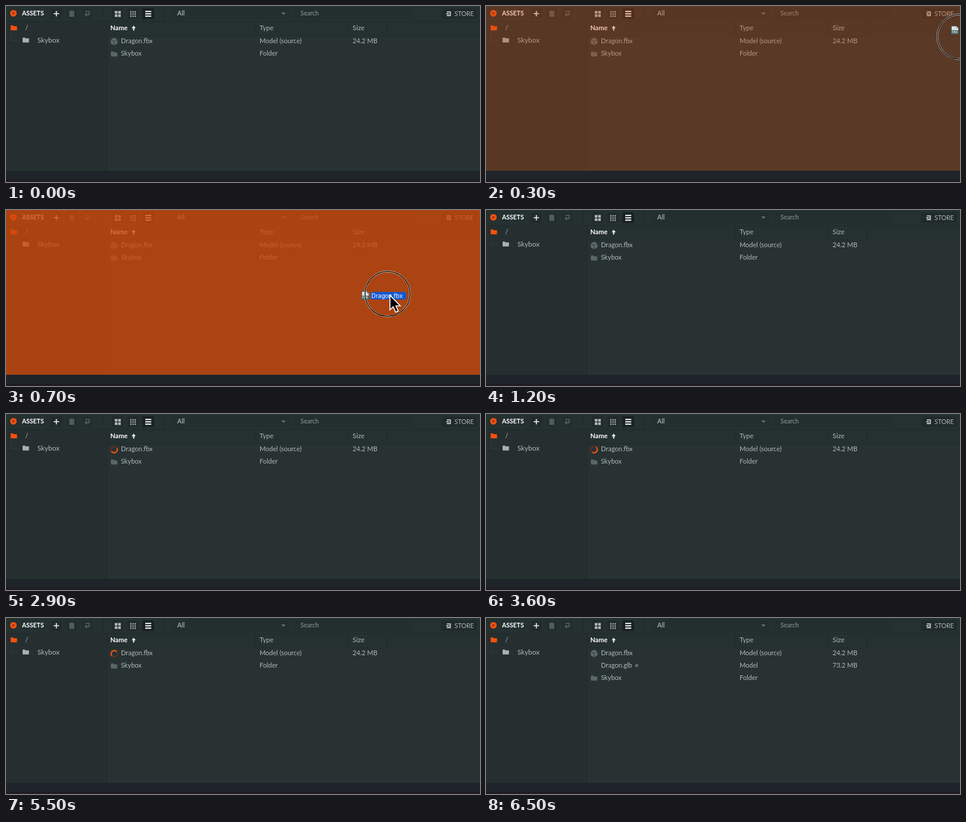
Write an HTML page that moves like this. It is 800x298 px and loops after 7.2 s.

```html
<!DOCTYPE html>
<html lang="en">
<head>
<meta charset="utf-8">
<title>Asset import</title>
<style>
html, body { margin: 0; width: 100%; height: 100%; overflow: hidden; background: #1e2429; }
svg { display: block; width: 100vw; height: 100vh; }
text { font: 11px Lato, sans-serif; fill: #b1b8b8; }
.bold { font-weight: 700; fill: #fff; }
.small { font-size: 10.5px; }
.tag { font: 10px Inter, sans-serif; fill: #fff; }
.ext { font: 700 5px Inter, sans-serif; fill: #e4eeee; }
.line { stroke: #1f292b; fill: none; }
</style>
</head>
<body>
<svg viewBox="0 0 800 298" preserveAspectRatio="none">
  <defs>
    <path id="folder" d="M0 1.2Q0 .4 .8 .4H4L5.2 1.8H10Q10.8 1.8 10.8 2.6V8Q10.8 8.8 10 8.8H.8Q0 8.8 0 8Z"/>
    <g id="cube">
      <path d="M6 0L11.6 3V9.4L6 12.6L.4 9.4V3Z" fill="#5d6a6c"/>
      <path d="M.6 3.2L6 6.2L11.4 3.2M6 6.2V12.4" fill="none" stroke="#2b3738" stroke-width=".9"/>
    </g>
    <g id="spinner" fill="none" stroke-width="2.4">
      <circle r="5.4" stroke="#5b3020"/>
      <path d="M1.4 -5.2A5.4 5.4 0 0 1 -1.4 5.2" stroke="#e8541a"/>
    </g>
  </defs>

  <rect width="800" height="298" fill="#1e2429"/>
  <rect y="294" width="800" height="4" fill="#211b23"/>
  <rect width="800" height="279" fill="#283233"/>
  <rect width="170" height="279" fill="#252f30"/>
  <rect width="800" height="27" fill="#253031"/>
  <rect x="170" y="27" width="630" height="23" fill="#253031"/>
  <path class="line" d="M170.5 27V279M421.5 27V50M578.5 27V50M642.5 27V50M170 50.5H800M0 26.5H800M163.5 0V26M266.5 0V26"/>

  <g fill="#212b2c">
    <rect x="76" y="4" width="18" height="18" rx="2"/>
    <rect x="102" y="4" width="18" height="18" rx="2" fill="#232d2e"/>
    <rect x="128" y="4" width="18" height="18" rx="2" fill="#232d2e"/>
    <rect x="179" y="4" width="19" height="18" rx="2"/>
    <rect x="205" y="4" width="19" height="18" rx="2"/>
    <rect x="230" y="4" width="20" height="18" rx="2" fill="#192122"/>
    <rect x="281" y="3" width="198" height="20" rx="2" fill="#232e2f"/>
    <rect x="488" y="3" width="198" height="20" rx="2" fill="#232e2f"/>
    <rect x="735" y="4" width="60" height="18" rx="2"/>
  </g>

  <circle cx="12.5" cy="12.3" r="5.6" fill="#f2500f"/>
  <path d="M10.4 11.4H14.6L12.5 14.2Z" fill="#253031"/>
  <text class="bold small" x="27" y="16">ASSETS</text>
  <path d="M80.5 13H89.5M85 8.5V17.5" stroke="#c9cfcf" stroke-width="2.2"/>
  <g fill="none" stroke="#566264" stroke-width="1.6">
    <path d="M106.5 9.6H115.5M109.5 8.4H112.5"/>
    <path d="M107.8 11.4H114.2V17.4H107.8Z" fill="#4b5759"/>
    <path d="M134 9.2H140.5V14.6H134.5M136.4 12L133.6 14.6L136.4 17.2"/>
  </g>
  <g id="grids" fill="#b0b8b8"></g>
  <path d="M235 9.2H245.2M235 13.2H245.2M235 17.2H245.2" stroke="#fff" stroke-width="1.9"/>
  <text x="289" y="16" style="fill:#c4caca">All</text>
  <path d="M464.6 11H472L468.3 15Z" fill="#657274"/>
  <text class="small" x="497" y="16" style="fill:#8f999a">Search</text>
  <path d="M744 10H749.8V16.2H744M743 13.1H747.5" fill="none" stroke="#b1b8b8" stroke-width="2.2"/>
  <text class="small" x="757" y="17">STORE</text>

  <use href="#folder" x="7.8" y="32.4" fill="#f2500f"/>
  <text x="32.5" y="41">/</text>
  <path d="M8.5 46V58.5H22" fill="none" stroke="#303c3d"/>
  <use href="#folder" x="28" y="53" fill="#a9b1b1"/>
  <text x="53" y="61.5" style="font-size:11.8px">Skybox</text>

  <text class="bold" x="176" y="41">Name</text>
  <path d="M215.5 41.5V36" stroke="#fff" stroke-width="2"/>
  <path d="M212 37.6L215.5 33.6L219 37.6Z" fill="#fff"/>
  <text x="428" y="41">Type</text>
  <text x="585" y="41" style="font-size:11.5px">Size</text>

  <use id="model" href="#cube" x="176.4" y="53.8"/>
  <text x="194" y="63">Dragon.fbx</text>
  <text x="428" y="63">Model (source)</text>
  <text x="585" y="63">24.2 MB</text>

  <g id="made">
    <text x="194" y="84">Dragon.glb</text>
    <circle cx="254.3" cy="80.5" r="2.7" fill="#5f6c6d"/>
    <text x="428" y="84">Model</text>
    <text id="size" x="585" y="84">73.2 MB</text>
  </g>
  <g id="sky">
    <use href="#folder" x="177" y="76.6" fill="#5a6769"/>
    <text x="194" y="84">Skybox</text>
    <text x="428" y="84">Folder</text>
  </g>
  <use id="spinA" href="#spinner"/>
  <use id="spinB" href="#spinner"/>

  <rect id="drop" width="800" height="279" fill="#d0490a"/>

  <g id="file">
    <path d="M.5 0H9L12.5 3.5V13.4H.5Z" fill="#d9e2e2" stroke="#3d5458" stroke-width=".8"/>
    <path d="M9 0V3.5H12.5Z" fill="#8fa4a7"/>
    <rect x=".5" y="7" width="12" height="6.4" fill="#3f6066"/>
    <text class="ext" x="1.3" y="12">FBX</text>
    <rect x="15.2" y=".8" width="60.3" height="12.6" rx="4" fill="#1158d1"/>
    <text class="tag" x="16.8" y="10.6">Dragon.fbx</text>
  </g>
  <g id="pointer">
    <circle r="38" fill="none" stroke="#f4f0ec" stroke-width="2.8" stroke-opacity=".8"/>
    <circle r="38" fill="none" stroke="#111" stroke-width="1.5"/>
    <path d="M4 2.5V27L9.6 21.8L13.6 31L18 29L14 20.2H21.4Z" fill="#000" stroke="#fff" stroke-width="1.6"/>
  </g>
</svg>
<script>
const LOOP = 7200, STEP = 100;
const $ = id => document.getElementById(id);

const pointerPath = [[300, 800, 52], [400, 740.7, 82], [500, 697, 110], [600, 662, 132], [700, 644, 142], [800, 644, 142], [1000, 663, 136]];
const filePath = [[300, 785, 34], [400, 717, 67], [500, 666, 99], [600, 623, 125], [700, 600, 138]];
const dropFade = [[200, 0], [300, .3], [400, .6], [500, .72], [700, .78], [800, .78], [1000, 0]];

function squares(n, x, y, size, pitch) {
  let out = '';
  for (let i = 0; i < n * n; i++) {
    out += `<rect x="${x + i % n * pitch}" y="${y + Math.floor(i / n) * pitch}" width="${size}" height="${size}"/>`;
  }
  return out;
}
$('grids').innerHTML = squares(2, 183.6, 8.4, 4.5, 5.7) + squares(3, 209.6, 8.8, 2.2, 3.7);

// Piecewise linear value of [time, ...values] keys
function sample(keys, t) {
  if (t <= keys[0][0]) return keys[0].slice(1);
  for (let i = 1; i < keys.length; i++) {
    const a = keys[i - 1], b = keys[i];
    if (t <= b[0]) {
      const k = (t - a[0]) / (b[0] - a[0]);
      return a.slice(1).map((v, j) => v + (b[j + 1] - v) * k);
    }
  }
  return keys[keys.length - 1].slice(1);
}

function show(id, on) {
  $(id).setAttribute('visibility', on ? 'visible' : 'hidden');
}

function place(id, [x, y], angle = 0) {
  $(id).setAttribute('transform', `translate(${x} ${y}) rotate(${angle})`);
}

function draw(time) {
  const t = Math.floor(time % LOOP / STEP) * STEP;
  const between = (a, b) => t >= a && t < b;

  $('drop').setAttribute('opacity', sample(dropFade, t)[0]);
  show('file', between(300, 900));
  place('file', sample(filePath, t));
  show('pointer', between(300, 1200));
  place('pointer', sample(pointerPath, t));
  $('pointer').setAttribute('opacity', t < 1100 ? 1 : .5);

  const angle = 45 + (t - 2900) / 750 * 360;
  show('model', !between(2900, 6000));
  show('spinA', between(2900, 6000));
  place('spinA', [182.6, 60.4], angle);
  show('spinB', between(5600, 6500));
  place('spinB', [182.6, 81], angle);

  const made = t >= 5600;
  show('made', made);
  show('size', t >= 6400);
  place('sky', [0, made ? 20.5 : 0]);
}

function tick(now) {
  draw(now);
  requestAnimationFrame(tick);
}
draw(0);
requestAnimationFrame(tick);
</script>
</body>
</html>
```
